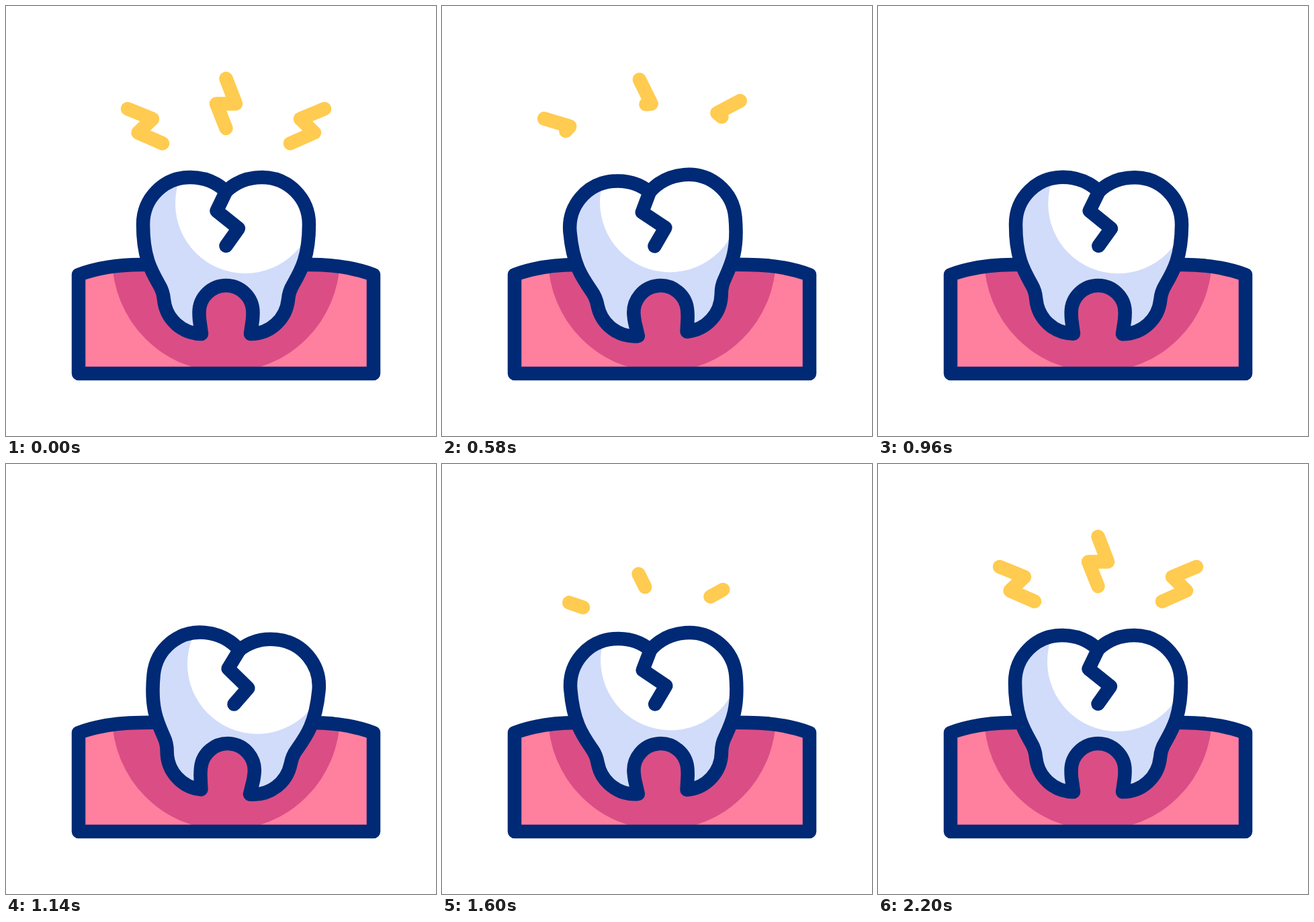
These frames come from a looping animation (640 by 640 pixels, 2400 ms). An HTML page:

```html
<!DOCTYPE html>
<html lang="en">
<head>
<meta charset="utf-8">
<title>Toothache</title>
<style>
  html, body { margin: 0; width: 100%; height: 100%; overflow: hidden; background: #fff; }
  svg { display: block; width: 100%; height: 100%; }
  .line { fill: none; stroke: #002a75; }
  .bolt { fill: none; stroke: #ffcb50; }
  .line, .bolt { stroke-width: 20.5; stroke-linecap: round; stroke-linejoin: round; }
</style>
</head>
<body>
<svg viewBox="0 0 640 640">
  <defs>
    <path id="gum" d="M108 547V400C138 389 168 385 200 385Q327.5 383 455 385C487 385 517 389 547 400V547Z"/>
    <path id="crown" d="M327.5 276C313 262 294 255 274 255C235 255 204 286 204 325
      C204 374 216 394 228 415Q234 425 235 437C238 466 262 488 291 488
      L288 467Q287.5 462 287.5 456A40 40 0 0 1 367.5 456Q367.5 462 367 467L364 488
      C393 488 417 466 420 437Q421 425 427 415C439 394 451 374 451 325
      C451 286 420 255 381 255C361 255 342 262 327.5 276Z"/>
    <clipPath id="inGum"><use href="#gum"/></clipPath>
    <clipPath id="inCrown"><use href="#crown"/></clipPath>
  </defs>
  <use href="#gum" fill="#ff7f9f"/>
  <circle cx="327.5" cy="375.5" r="169.5" fill="#da4e85" clip-path="url(#inGum)"/>
  <use href="#gum" class="line"/>
  <g id="tooth">
    <use href="#crown" fill="#d1dcfa"/>
    <g clip-path="url(#inCrown)"><circle cx="356" cy="294" r="104" fill="#fff"/></g>
    <use href="#crown" class="line"/>
    <path class="line" d="M327.5 276L313.5 305L346 331L327.5 357"/>
    <path class="bolt" pathLength="1" d="M181 153L218 168L196.500 188.500L233 204.500"/>
    <path class="bolt" pathLength="1" d="M327.500 108L342 145.500H313L327.500 182"/>
    <path class="bolt" pathLength="1" d="M474 153L438 168L459 188.500L423 204.500"/>
  </g>
</svg>
<script>
const LOOP = 2400, HOLD = 200, MOVE = 2000, STEP = 20;
const SWING = [0, -6, 6, -6, 0];
const tooth = document.getElementById('tooth');
const bolts = document.querySelectorAll('.bolt');

const clamp = v => Math.min(1, Math.max(0, v));
const ease = u => (1 - Math.cos(Math.PI * clamp(u))) / 2;
const span = (p, from, to) => ease((p - from) / (to - from));

function swingAngle(p) {
  const i = Math.min(3, Math.floor(p * 4));
  return SWING[i] + (SWING[i + 1] - SWING[i]) * ease(p * 4 - i);
}

function render(ms) {
  const t = Math.floor((ms % LOOP) / STEP) * STEP;
  const p = clamp((t - HOLD) / MOVE);
  tooth.setAttribute('transform', `rotate(${swingAngle(p)} 327.5 480)`);

  // Bolts retract towards their outer end, then grow back from the inner end.
  const growing = p > 0.5;
  const shown = growing ? span(p, 0.593, 0.955) : 1 - span(p, 0, 0.356);
  for (const bolt of bolts) {
    bolt.style.display = shown > 0.001 ? '' : 'none';
    bolt.style.strokeDasharray = shown < 1 ? `${shown} 2` : 'none';
    bolt.style.strokeDashoffset = growing ? shown - 1 : 0;
  }
}

const start = performance.now();
function tick() {
  render(performance.now() - start);
  requestAnimationFrame(tick);
}
tick();
</script>
</body>
</html>
```
